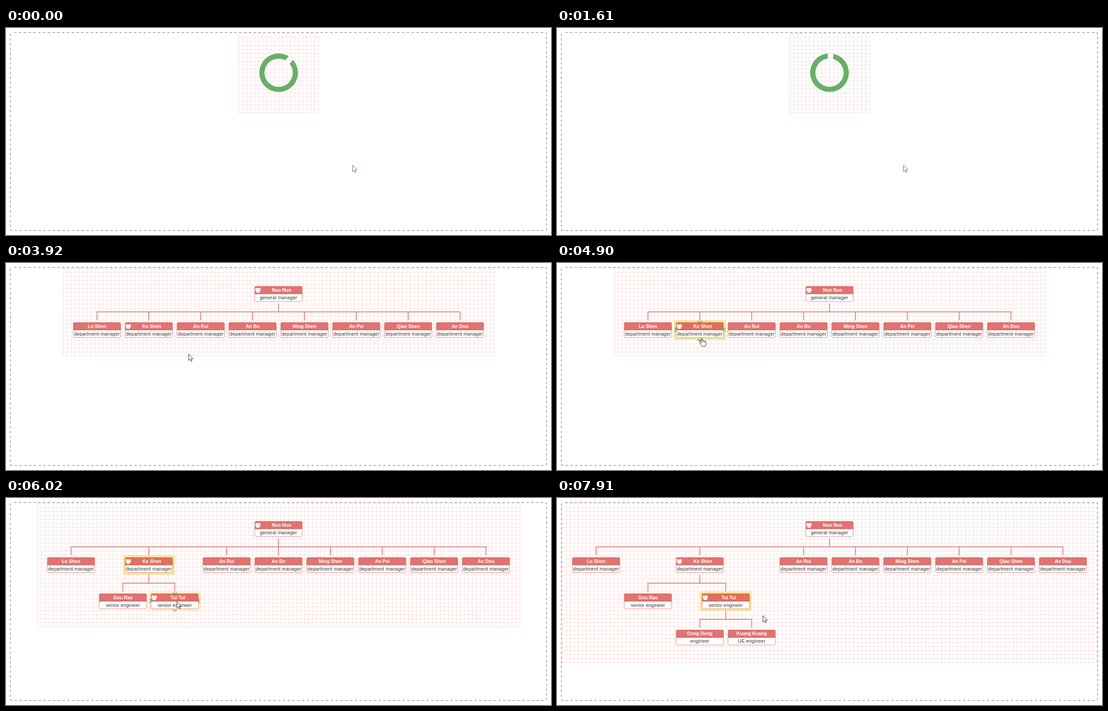
An HTML page that plays this animation: 1213 px wide and 462 px high, repeating every 8470 ms.

```html
<!DOCTYPE html>
<html lang="en">
<head>
<meta charset="utf-8">
<title>Organisation chart</title>
<style>
  html, body { margin: 0; width: 100%; height: 100%; overflow: hidden; background: #fff; }
  svg { display: block; width: 1213px; height: 462px; }
  text { font: 12px "Liberation Sans", Arial, sans-serif; text-anchor: middle; }
  .name { font-weight: bold; fill: #fff; letter-spacing: -.15px; }
  .role { fill: #333; letter-spacing: .2px; }
  .grid { fill: none; stroke: rgba(200, 0, 0, .15); }
  .link { fill: none; stroke: #e17572; stroke-width: 2; }
  .title { fill: rgba(217, 83, 79, .8); }
  .body { fill: #fff; stroke: #e17572; }
  .icon { fill: #fff; }
  .glow { fill: rgba(238, 217, 54, .5); }
  .edge { fill: none; stroke: #449d44; stroke-width: 3; stroke-opacity: .5; }
  .frame { fill: none; stroke: #a0a0a0; stroke-width: 2; stroke-dasharray: 6; stroke-dashoffset: -5.5; }
  .pointer { fill: #fff; stroke: #222; stroke-width: 1.1; stroke-linejoin: round; }
</style>
</head>
<body>
<svg viewBox="0 0 1366 520.28" preserveAspectRatio="xMinYMin">
  <g id="grids"></g>
  <g id="glows"></g>
  <g id="charts"></g>
  <path id="spinner" fill="rgba(68,157,68,.8)"/>
  <g id="edges"></g>
  <rect class="frame" x="11" y="11" width="1344" height="498" rx="4"/>
  <g id="pointer" class="pointer">
    <path id="arrow" d="M.5 .5V16.5L4.2 13L6.6 18.6L9 17.6L6.6 12.1H11.6Z"/>
    <path id="hand" d="M-1.5 2Q0-.5 1.5 2V7Q4 6 4.7 8Q7 7 7.7 9Q10.3 8.5 10.3 11V15L8.3 21.5H0L-5.5 13.5Q-6.5 11.3-4.5 11L-1.5 13.5ZM1.5 7V10.5M4.7 8V11M7.7 9V11.5"/>
  </g>
</svg>
<script>
const LOOP = 8470, STEP = 70;
const SCALE = 1213 / 1366, MID = 683, COL = 130, ROW = 91, TOP = 53, NODE_H = 49;
const SHOW = [0, 2590, 5320, 6930];

const person = (name, role, kids = []) => ({ name, role, kids });
const manager = (name, kids) => person(name, 'department manager', kids);
const tree = person('Nuo Nuo', 'general manager', [
  manager('Lo Shen'),
  manager('Ke Shen', [
    person('Gou Rao', 'senior engineer'),
    person('Tui Tui', 'senior engineer', [
      person('Dong Dong', 'engineer'),
      person('Kuang Kuang', 'UE engineer')
    ])
  ]),
  manager('An Rui'), manager('An Bo'), manager('Ming Shen'),
  manager('An Pei'), manager('Qiao Shen'), manager('An Dou')
]);

const $ = id => document.getElementById(id);
function add(parent, tag, attrs = {}, text = '') {
  const el = document.createElementNS('http://www.w3.org/2000/svg', tag);
  for (const key in attrs) el.setAttribute(key, attrs[key]);
  el.textContent = text;
  return parent.appendChild(el);
}
const path = (parent, cls, d) => add(parent, 'path', { class: cls, d });
const move = (el, x, y) => el.setAttribute('transform', `translate(${x} ${y})`);
const show = (el, on) => el.setAttribute('visibility', on ? 'visible' : 'hidden');

function drawGrid(width, bottom) {
  const g = add($('grids'), 'g'), left = MID - width / 2;
  let across = '', down = '';
  for (let x = 0; x <= width; x += 10) down += `M${left + x + .5} 12V${bottom}`;
  for (let y = 13; y < bottom; y += 10) across += `M${left - 1} ${y + .5}H${left + width + 1}`;
  path(g, 'grid', down);
  path(g, 'grid', across);
  return g;
}

function drawNode(parent, node, x, y) {
  const g = add(parent, 'g'), lead = node.kids.length > 0;
  move(g, x, y + 5);
  path(g, 'body', 'M-59.5 19.5V35q0 3.5 3.5 3.5H56q3.5 0 3.5-3.5V19.5Z');
  path(g, 'title', 'M-60 20V4q0-4 4-4H56q4 0 4 4V20Z');
  add(g, 'text', { class: 'name', x: lead ? 7.5 : 0, y: 14 }, node.name);
  add(g, 'text', { class: 'role', x: 0, y: 33.3 }, node.role);
  if (!lead) return;
  const icon = add(g, 'g', { class: 'icon', transform: 'translate(-58.5 4)' });
  for (const [cx, cy, r] of [[7, 4.2, 3], [2.6, 2.4, 2], [11.4, 2.4, 2]]) add(icon, 'circle', { cx, cy, r });
  for (const [x, y, width, height] of [[2.6, 7, 8.8, 5.4], [0, 4.6, 4, 3.6], [10, 4.6, 4, 3.6]])
    add(icon, 'rect', { x, y, width, height, rx: 1.6 });
}

function drawChart(depth) {
  const leaves = (n, d) => d < depth && n.kids.length
    ? n.kids.reduce((sum, kid) => sum + leaves(kid, d + 1), 0) : 1;
  const root = add($('charts'), 'g'), fixed = add(root, 'g'), fresh = add(root, 'g');
  const total = leaves(tree, 0);

  function place(node, level, left) {
    const x = left + leaves(node, level) * COL / 2, y = TOP + level * ROW;
    drawNode(level === depth ? fresh : fixed, node, x, y);
    if (level === depth || !node.kids.length) return x;
    let edge = left;
    const xs = node.kids.map(kid => {
      const at = place(kid, level + 1, edge);
      edge += leaves(kid, level + 1) * COL;
      return at;
    });
    const bar = y + 70;
    path(fixed, 'link', `M${x} ${y + NODE_H}V${bar}M${xs[0] - 1} ${bar}H${xs[xs.length - 1] + 1}`
      + xs.map(k => `M${k} ${bar}V${y + ROW}`).join(''));
    return x;
  }
  place(tree, 0, MID - total * COL / 2);
  return { root, fresh, grid: drawGrid(total * COL + 40, 143 + depth * ROW) };
}

// Hover highlight and the four chevrons of one node
function drawHover(x, y, times) {
  const glow = add($('glows'), 'rect', { class: 'glow', x: x - 65, y, width: COL, height: NODE_H });
  const edges = add($('edges'), 'g');
  move(edges, x, y);
  path(edges, 'edge', 'M-5 1.5L0 6.5L5 1.5');
  path(edges, 'edge', 'M-63.5 19L-58.5 24L-63.5 29');
  path(edges, 'edge', 'M64 19L59 24L64 29');
  return { glow, edges, bottom: path(edges, 'edge', 'M-5 45L0 50L5 45'), ...times };
}

function ringPath(outer, inner, half) {
  const yo = -Math.sqrt(outer ** 2 - half ** 2), yi = -Math.sqrt(inner ** 2 - half ** 2);
  return `M${half} ${yo}A${outer} ${outer} 0 1 1 ${-half} ${yo}V${yi}A${inner} ${inner} 0 1 0 ${half} ${yi}Z`;
}

const smallGrid = drawGrid(200, 214);
const charts = [1, 2, 3].map(drawChart);
const hovers = [
  drawHover(358, TOP + ROW, { enter: 4340, leave: 5600, press: 4760, release: 5600, blur: 6930 }),
  drawHover(423, TOP + 2 * ROW, { enter: 5880, leave: 7630, press: 6510, release: 7000, blur: LOOP })
];
$('spinner').setAttribute('d', ringPath(48.4, 35.4, 7));

const turn = [[0, 39.5], [1610, 363.5], [2520, 539.5], [2590, 553]];
const track = [
  [0, 771, 306], [3220, 771, 306], [3430, 675, 290], [3640, 530, 258], [3780, 446, 235],
  [3920, 406, 203], [4130, 369, 185], [4480, 345, 165], [4760, 325, 167], [4900, 322.5, 167],
  [5460, 322.5, 167], [5740, 352, 196], [6020, 380, 231], [6160, 382, 237], [6510, 379, 247],
  [6650, 378, 248], [6930, 378, 248], [7140, 385, 248], [7280, 385, 248], [7420, 394, 252],
  [7560, 394, 252], [7770, 456, 261], [7840, 456, 261], [7910, 458, 262]
];

const clamp = v => Math.max(0, Math.min(1, v));
const ease = v => 1 - (1 - clamp(v)) ** 2.2;
function sample(keys, t) {
  const i = keys.findIndex(k => k[0] > t);
  if (i < 0) return keys[keys.length - 1].slice(1);
  const [a, b] = [keys[i - 1], keys[i]], f = (t - a[0]) / (b[0] - a[0]);
  return a.slice(1).map((v, n) => v + (b[n + 1] - v) * f);
}

function render(t) {
  const scene = SHOW.filter(s => s <= t).length - 1;
  show(smallGrid, scene === 0);
  show($('spinner'), scene === 0);
  const [angle] = sample(turn, t);
  $('spinner').setAttribute('transform', `translate(683 112.9) rotate(${angle}) translate(0 -.6)`);

  charts.forEach(({ root, fresh, grid }, i) => {
    show(root, scene === i + 1);
    show(grid, scene === i + 1);
    const e = i ? ease((t - SHOW[i + 1] + STEP) / 280) : 1;
    move(fresh, 0, -40 * (1 - e));
    fresh.setAttribute('opacity', e);
  });

  let pressing = false;
  for (const h of hovers) {
    const over = t >= h.press && t < h.release;
    pressing = pressing || over;
    h.glow.setAttribute('opacity', t < h.blur ? ease((t - h.enter) / 500) : 0);
    show(h.edges, t >= h.enter && t < h.leave);
    h.bottom.style.strokeOpacity = over ? .5 + .5 * clamp((t - h.press) / 200) : .5;
    move(h.bottom, 0, over ? 2.5 : 0);
  }

  const [x, y] = sample(track, t);
  move($('pointer'), x / SCALE, y / SCALE);
  $('pointer').style.stroke = scene ? '#222' : '#3d6e3d';
  show($('arrow'), !pressing);
  show($('hand'), pressing);
}

function tick() {
  const t = performance.now() % LOOP;
  render(Math.floor(t / STEP) * STEP);
  requestAnimationFrame(tick);
}
tick();
</script>
</body>
</html>
```
